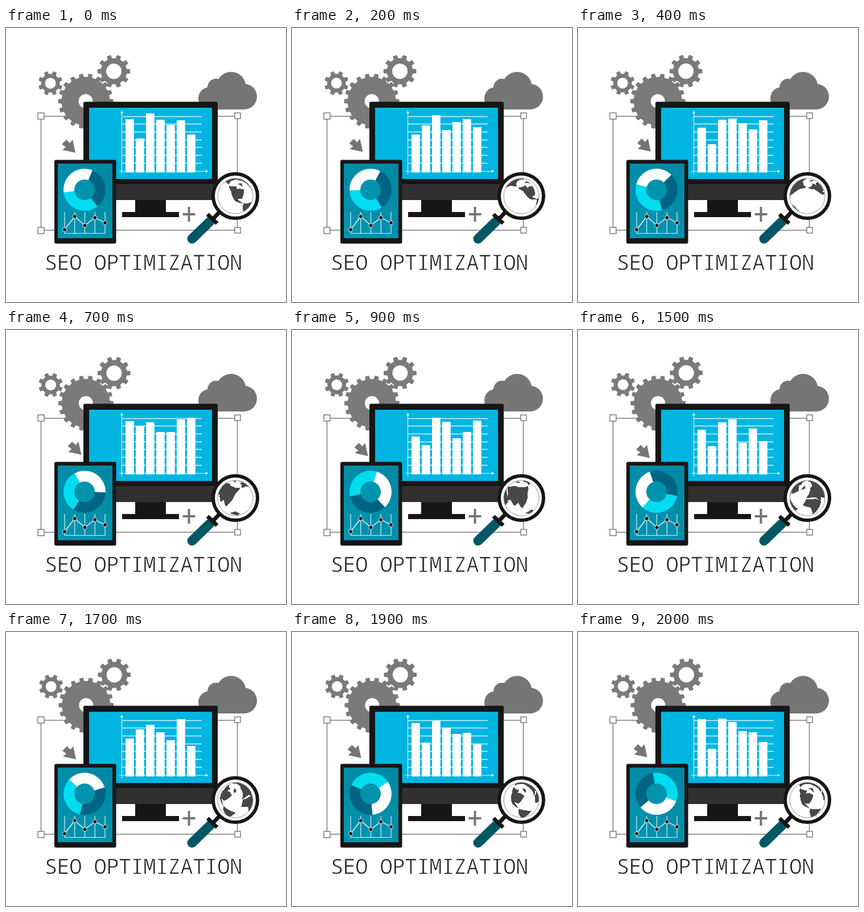
Write an HTML page with a canvas that moves like this. It is 492 by 481 pixels and loops after 2100 ms.

```html
<!DOCTYPE html>
<html lang="en">
<head>
<meta charset="utf-8">
<title>SEO optimization</title>
<style>
html, body { margin: 0; width: 100%; height: 100%; overflow: hidden; background: #fff; }
canvas { display: block; }
</style>
</head>
<body>
<canvas id="stage" width="492" height="481"></canvas>
<script>
const c = document.getElementById('stage').getContext('2d');
const TAU = Math.PI * 2, RAD = Math.PI / 180, STEPS = 21;
const GRAY = '#757575', BLACK = '#161616', WHITE = '#fff', TEAL = '#0093ad';

// A wave that peaks at the given step and repeats a whole number of times per loop
const wave = (step, mean, size, peak, times = 1) =>
  mean + size * Math.cos(TAU * times * (step - peak) / STEPS);

// Mean top, swing, peak step and repeats of each bar
const bars = [
  [171, 18, 2.5, 3], [187, 18, 20, 4], [157, 7, 5.7, 2], [168, 11, 1.9, 4],
  [183, 18, 13, 1], [166, 13, 3.7, 4], [177, 23, 17.3, 1]
];

// Rough coastlines as longitude, latitude
const land = new Path2D([
  '-168,66 -95,72 -94,59 -78,62 -55,52 -81,26 -97,28 -78,8 -106,22 -130,54',
  '-58,81 -22,72 -44,60',
  '-78,8 -35,-7 -57,-37 -69,-54 -81,-5',
  '-6,35 32,31 51,12 20,-35 9,4 -17,13',
  '-9,37 8,54 26,71 105,77 180,69 137,54 121,28 103,2 90,22 78,8 58,25 45,13 35,35 16,39',
  '114,-23 136,-11 153,-28 145,-39'
].map(s => 'M' + s + 'Z').join(''));

function box(x, y, w, h, color, r = 0) {
  c.fillStyle = color;
  c.beginPath();
  c.roundRect(x, y, w, h, r);
  c.fill();
}

function disc(x, y, r, color) {
  c.fillStyle = color;
  c.beginPath();
  c.arc(x, y, r, 0, TAU);
  c.fill();
}

function circle(x, y, r, color, width) {
  c.strokeStyle = color;
  c.lineWidth = width;
  c.beginPath();
  c.arc(x, y, r, 0, TAU);
  c.stroke();
}

function line(points, color, width) {
  c.strokeStyle = color;
  c.lineWidth = width;
  c.beginPath();
  points.forEach(([x, y]) => c.lineTo(x, y));
  c.stroke();
}

function shape(points, color) {
  c.fillStyle = color;
  c.beginPath();
  points.forEach(([x, y]) => c.lineTo(x, y));
  c.fill();
}

function gear(x, y, outer, root, hole, teeth) {
  const pitch = TAU / teeth;
  c.fillStyle = '#7a7a7a';
  c.beginPath();
  for (let i = 0; i < teeth; i++) {
    for (const [part, r] of [[-0.29, root], [-0.2, outer], [0.2, outer], [0.29, root]]) {
      const a = (i + 0.5 + part) * pitch - Math.PI / 2;
      c.lineTo(x + r * Math.cos(a), y + r * Math.sin(a));
    }
  }
  c.closePath();
  c.moveTo(x + hole, y);
  c.arc(x, y, hole, 0, TAU);
  c.fill('evenodd');
}

function gears(step) {
  const drift = step / STEPS;
  gear(140 + drift, 128.5, 48.5, 42.5, 12.5, 18);
  gear(78 + 1.5 * drift, 97 - 1.5 * drift, 21.5, 16.5, 9.5, 8);
  gear(189.5 + drift, 76 - drift, 29, 23, 13.5, 10);
}

function frame() {
  c.strokeStyle = GRAY;
  c.lineWidth = 1.4;
  c.strokeRect(61.5, 155, 345, 200);
  for (const [x, s] of [[56, 11], [402, 10]]) {
    for (const y of [149, 350]) {
      box(x, y, s, s, WHITE);
      c.strokeRect(x, y, s, s);
    }
  }
}

function cloud() {
  disc(395.5, 103, 26, GRAY);
  disc(369, 104, 15, GRAY);
  disc(418.5, 120.5, 22.5, GRAY);
  box(338, 104, 82, 39, GRAY, [19, 0, 0, 19]);
}

function arrow(x, y) {
  shape([[x, y], [x - 5, y - 23], [x - 10, y - 17], [x - 16, y - 23],
    [x - 24, y - 15], [x - 17, y - 10], [x - 23, y - 5]], GRAY);
}

function monitor(step) {
  box(227, 300, 54, 25, BLACK);
  box(204, 323, 100, 9, BLACK);
  box(136, 129.5, 236, 172.5, BLACK, 3);
  box(136, 274, 236, 28, '#303030', [0, 0, 3, 3]);
  box(146, 140, 216, 125, '#00b5e1');
  const pale = '#d3f2fa';
  for (let i = 0; i < 7; i++) {
    const y = 155.5 + Math.floor(i * 13.7);
    line([[203, y], [344, y]], pale, 1.3);
  }
  line([[203.5, 148], [203.5, 257]], pale, 1.2);
  line([[199, 251.5], [353, 251.5]], pale, 1.2);
  shape([[203.5, 145], [206, 150], [201, 150]], WHITE);
  shape([[355, 251.5], [351, 249], [351, 254]], WHITE);
  bars.forEach((bar, i) => {
    const top = Math.round(wave(step, ...bar));
    box(210 + i * 18, top, 14.7, 253.5 - top, WHITE);
  });
}

function tablet(step) {
  box(85, 231.5, 108.5, 147, BLACK, 3);
  const fill = c.createLinearGradient(91, 369, 187, 238);
  fill.addColorStop(0, '#0096b1');
  fill.addColorStop(1, '#0087a2');
  box(91, 238, 96, 131, fill);

  // The ring spins ever faster until the loop restarts
  const turn = 172 + 1.42 * step ** 2;
  [WHITE, '#006583', '#00dcf0'].forEach((color, i) => {
    const from = (turn + i * 120) * RAD;
    c.fillStyle = color;
    c.beginPath();
    c.moveTo(138, 284);
    c.arc(138, 284, 37, from, from + 120.5 * RAD);
    c.fill();
  });
  disc(138, 284, 18, TEAL);

  const pale = '#d8f0f4';
  const dots = [354, 331, 346.5, 333, 342].map((y, i) => [103 + i * 17.75, y]);
  dots.forEach(([x]) => line([[x, 323], [x, 360.5]], pale, 1.2));
  line([[103, 360.5], [174.5, 360.5]], pale, 1.2);
  line(dots, WHITE, 1.3);
  dots.forEach(([x, y]) => {
    disc(x, y, 3.8, WHITE);
    disc(x, y, 3, BLACK);
  });
}

// Orthographic view, tested point by point against the coastlines
function globe(lon) {
  const X = 403, Y = 295, R = 31, tilt = 38 * RAD;
  const sin = Math.sin(tilt), cos = Math.cos(tilt);
  c.fillStyle = '#484848';
  for (let py = -R; py < R; py++) {
    for (let px = -R; px < R; px++) {
      const x = (px + 0.5) / R, y = -(py + 0.5) / R, zz = 1 - x * x - y * y;
      if (zz < 0) continue;
      const z = Math.sqrt(zz);
      const lat = Math.asin(y * cos + z * sin) / RAD;
      const east = lon + Math.atan2(x, z * cos - y * sin) / RAD;
      const wrapped = ((east + 180) % 360 + 360) % 360 - 180;
      if (c.isPointInPath(land, wrapped, lat)) c.fillRect(X + px, Y + py, 1, 1);
    }
  }
  circle(X, Y, R, '#8a8a8a', 0.9);
}

function magnifier(step) {
  line([[377, 321], [362, 337]], BLACK, 7);
  c.lineCap = 'round';
  line([[358, 340], [327, 370]], '#005865', 17);
  c.lineCap = 'butt';
  line([[354, 327], [371, 343]], BLACK, 7);
  disc(403, 295, 39, WHITE);
  globe(-105 - 360 * step / STEPS);
  circle(403, 295, 39, BLACK, 6);
}

// A white outline trims the letters to a light weight
function caption() {
  c.font = "300 extra-condensed 38px 'Noto Sans Mono', 'DejaVu Sans Mono', monospace";
  c.textAlign = 'center';
  c.fillStyle = '#222';
  c.strokeStyle = WHITE;
  c.lineWidth = 0.9;
  [...'SEO OPTIMIZATION'].forEach((letter, i) => {
    const x = 79 + i * 21.67;
    c.fillText(letter, x, 425);
    c.strokeText(letter, x, 425);
  });
}

function draw(time) {
  const step = Math.floor(time / 100) % STEPS;
  box(0, 0, 492, 481, WHITE);
  frame();
  gears(step);
  cloud();
  arrow(wave(step, 127.5, 6, 9), wave(step, 221, 4, 14));
  monitor(step);
  tablet(step);
  box(310.5, 325, 22, 4, GRAY);
  box(319.5, 314, 4, 26, GRAY);
  magnifier(step);
  caption();
}

const start = performance.now();
function tick() {
  draw(performance.now() - start);
  requestAnimationFrame(tick);
}
tick();
</script>
</body>
</html>
```
